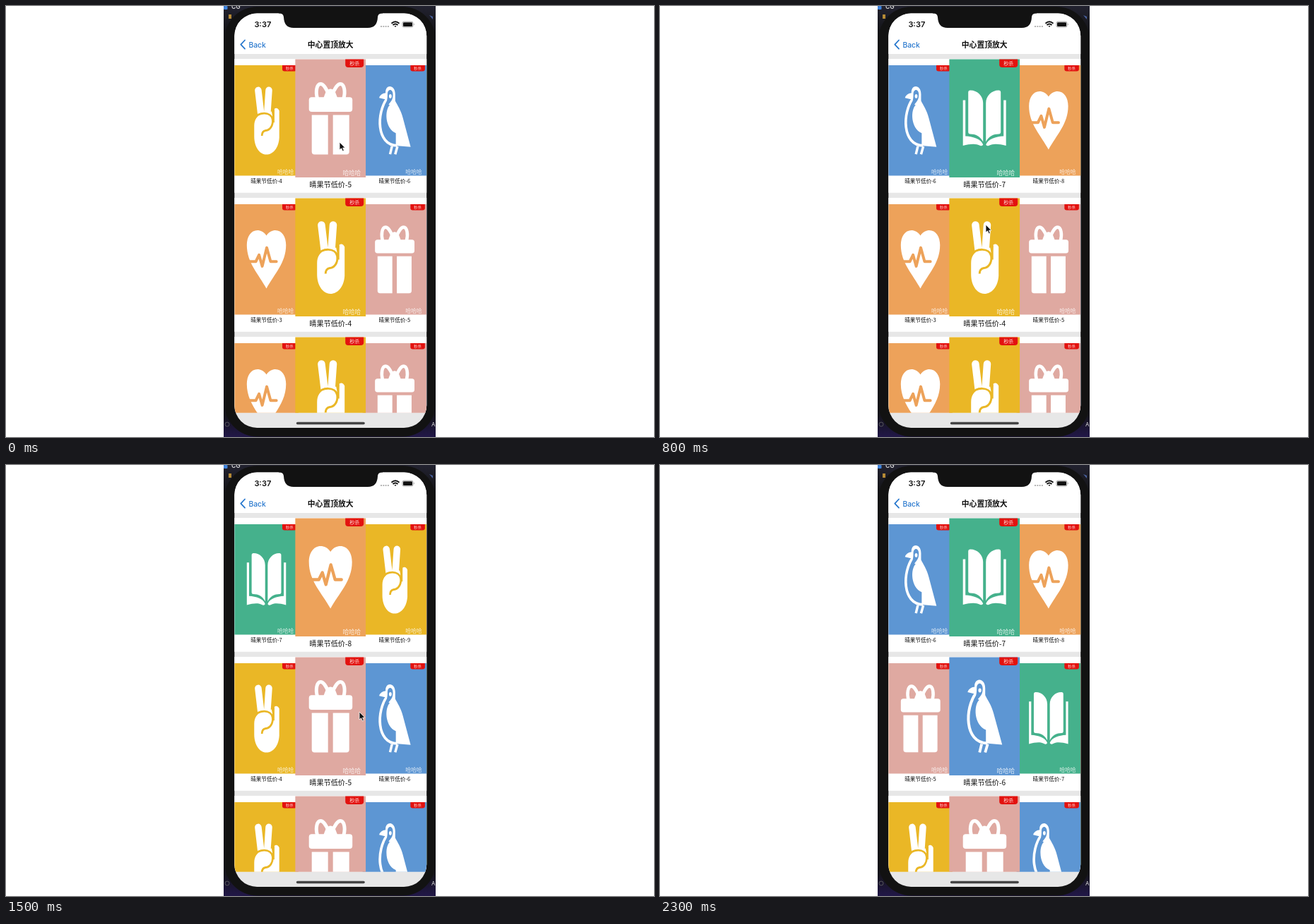
Write an HTML page that moves like this. It is 917 px wide and 611 px high and loops after 2.4 s.

```html
<!DOCTYPE html>
<html lang="zh">
<head>
<meta charset="utf-8">
<title>中心置顶放大</title>
<style>
  html, body { margin: 0; width: 100%; height: 100%; overflow: hidden; background: #fff; }
  svg { display: block; width: 917px; height: 611px; }
  text { font-family: "Noto Sans CJK SC", "Noto Sans CJK", sans-serif; }
  .ui { font-family: Inter, Roboto, sans-serif; }
</style>
</head>
<body>
<svg viewBox="0 0 917 611" xmlns="http://www.w3.org/2000/svg">
  <defs>
    <clipPath id="screen"><rect x="323.3" y="10.5" width="271.9" height="587.5" rx="32"/></clipPath>
    <clipPath id="desk"><rect x="308" width="300" height="611"/></clipPath>
    <linearGradient id="wall" x2="0" y2="1">
      <stop offset="0" stop-color="#222230"/><stop offset=".06" stop-color="#141417"/>
      <stop offset=".95" stop-color="#15141b"/><stop offset="1" stop-color="#211748"/>
    </linearGradient>
  </defs>

  <g clip-path="url(#desk)">
    <rect x="308" width="300" height="611" fill="url(#wall)"/>
    <rect x="308" width="5.5" height="5" rx="1" fill="#3f83dc"/>
    <path d="M315 12h4v6h-4z" fill="#b58a35"/>
    <path d="M599 13l5 2v4z" fill="#4861a0"/>
    <circle cx="313" cy="593" r="3" fill="none" stroke="#55555c"/>
    <text class="ui" x="602" y="596" font-size="8" fill="#ddd">Al</text>
    <rect x="309.5" y="1" width="298" height="609.5" rx="46" fill="#121212"/>
    <text class="ui" x="319" y="4" font-size="8.5" font-weight="600" fill="#ddd">CG</text>
  </g>

  <g clip-path="url(#screen)">
    <rect x="323" y="10" width="273" height="589" fill="#e7e7e7"/>
    <rect x="323" y="10" width="273" height="58" fill="#fff"/>
    <g id="rows"></g>
    <text class="ui" x="363.3" y="30" font-size="11" font-weight="600" text-anchor="middle" fill="#111">3:37</text>
    <path d="M530 29h12" stroke="#b5b5b5" stroke-width="2" stroke-dasharray="2 1.3"/>
    <g fill="none" stroke="#111" stroke-width="1.9">
      <path d="M545.5 24.8Q551 19.8 556.5 24.8M547.5 27Q551 23.9 554.5 27"/>
      <path d="M549.5 28.6L551 30L552.5 28.6Q551 27.3 549.5 28.6Z" fill="#111" stroke="none"/>
    </g>
    <rect x="561" y="22.2" width="15" height="7.8" rx="2.2" fill="#fff" stroke="#888" stroke-width=".8"/>
    <rect x="562" y="23.2" width="13" height="5.8" rx="1.3" fill="#111"/>
    <path d="M577 24.5q1.4 1.5 0 3z" fill="#777"/>
    <path d="M338 48.5L332.3 54.6L338 60.7" fill="none" stroke="#2878ce" stroke-width="1.8" stroke-linecap="round" stroke-linejoin="round"/>
    <text class="ui" x="343.5" y="58.5" font-size="10.3" font-weight="500" fill="#2878ce">Back</text>
    <text x="459.2" y="58.6" font-size="10.8" font-weight="700" text-anchor="middle" fill="#111">中心置顶放大</text>
    <rect x="410.800" y="589.7" width="97" height="3.6" rx="1.8" fill="#444"/>
  </g>
  <path d="M386 9V10.5C391 10.5 392.5 12 393 16C393.5 26 398 31 407 31H512C521 31 525.5 26 526 16C526.5 12 528 10.5 533 10.5V9Z" fill="#121212"/>

  <path id="cursor" d="M0 0V11L2.6 8.8L4.4 12.8L6.3 12L4.6 8.1H7.9Z" fill="#111" stroke="#fff" stroke-width=".8"/>
</svg>

<script>
const STEP = 100, STEPS = 24;
const MID = 459.2, GAP = 90.67, PITCH = 197;
const CARD_W = 99.7, CARD_H = 167.5;

// Icons are drawn from the top centre of an enlarged card.
const page = `<path d="M-23 47Q-23 44-20 44C-10 44-2 52-2 62V117C-6 109-13 106-20 106Q-23 106-23 103Z"/>
  <path d="M-30.5 58H-27V109C-16 109.5-5 113-2 121Q-3 123.5-6 122.5C-13 119-20 120-30.5 122.5Z"/>`;
const loop = `<path d="M-2 50C-6 43-9 35-14 35C-19.5 35-21.5 46-18.500 56" fill="none" stroke="#fff" stroke-width="5"/>`;
const mirror = part => part + `<g transform="scale(-1 1)">${part}</g>`;

const kinds = [
  { color: '#dfa9a1', icon: mirror(loop) + `<path d="M-6.500 46Q0 38 6.500 46L10 55H-10Z"/>
      <rect x="-30.5" y="53.7" width="61.5" height="20.8" rx="4"/>` +
      mirror('<path d="M-3.5 79H-26.5V131Q-26.5 135-22.5 135H-3.5Z"/>') },
  { color: '#5d96d3', icon: `
      <path d="M-14 42C-15 28.5 1 28.5 1 44V57C-2 63-9 62-11 57L-13 52L-16 51.5L-24 49.5Q-22 43-14 42Z"/>
      <path d="M-12 51C-28 72-29 121 4 122" fill="none" stroke="#fff" stroke-width="4"/>
      <path d="M-7 60C-16 68-15 96 2 103V122L25 124L13 80C10 68 4 60 1 54Z"/>
      <path d="M-11 44C-11 35-2.5 35-2.5 45C-2.5 56-10 57-13 66L-15 60C-12 56-11 52-11 44Z" fill="#5d96d3"/>
      <ellipse cx="-6.6" cy="47" rx="2.1" ry="3"/>
      <path d="M-4 123L-7 135M4.5 123L1 135" stroke="#fff" stroke-width="3.8"/>` },
  { color: '#45b18c', icon: mirror(page) },
  { color: '#eda25a', icon: `
      <path d="M0 47.5C-4 41.500-9 39.5-14 39.5C-24 39.5-30.5 49-30.5 62C-30.5 89-12 106 0 128C12 106 30.5 89 30.5 62C30.5 49 24 39.5 14 39.5C9 39.5 4 41.5 0 47.5Z"/>
      <path d="M-29 87H-16.500L-11.5 77L-6.5 94L.5 66L6.5 87H15.5" fill="none" stroke="#eda25a" stroke-width="4.4" stroke-linecap="round" stroke-linejoin="round"/>` },
  { color: '#eab726', icon: `
      <path d="M-12.8 38L-8 78M3.8 38L1 78" stroke="#fff" stroke-width="10.5" stroke-linecap="round"/>
      <path d="M-19 92C-19 82-14 76-8 74L8 70L11 85L12.5 66Q17 63 20 69V110C19 126 10 135.5 0 135.5C-12 135-19 122-19 108Z"/>
      <path d="M-18.5 81C-12 70 7 70 9.5 82C11 92 5 98.5-1 99C-5 99.500-7 103-7 107M11 67V87" fill="none" stroke="#eab726" stroke-width="3"/>` }
];

// Keys are [step, value...]; a step is a tenth of a second.
const scrolls = [
  [[0, 5], [1, 5.2], [2, 5.75], [3, 5.98], [4, 6], [5, 6.3], [6, 6.86], [7, 7],
   [11, 7], [12, 7.25], [13, 7.796], [14, 7.98], [15, 8], [19, 8], [20, 7.6], [21, 7.15], [22, 7.01], [23, 7]],
  [[8, 4], [9, 4.4], [10, 4.875], [11, 5], [15, 5], [16, 5.65], [17, 5.98], [18, 6]],
  [[10, 4], [11, 4.6], [12, 4.96], [13, 5]]
];
const pointer = [[0, 472, 193], [2, 425, 188], [4, 512, 176], [6, 430, 182], [8, 461, 310], [9, 440, 360],
  [10, 534, 502], [11, 450, 510], [12, 520, 190], [13, 490, 162], [15, 500, 350], [16, 430, 345],
  [17, 443, 240], [19, 425, 170], [21, 530, 165]];

const mix = (a, b, p) => a + (b - a) * p;

function sample(keys, step) {
  if (step <= keys[0][0]) return keys[0].slice(1);
  const i = keys.findIndex(k => k[0] >= step);
  if (i < 0) return keys[keys.length - 1].slice(1);
  const a = keys[i - 1], b = keys[i], p = (step - a[0]) / (b[0] - a[0]);
  return a.slice(1).map((v, j) => mix(v, b[j + 1], p));
}

function make(parent, html) {
  const g = document.createElementNS('http://www.w3.org/2000/svg', 'g');
  g.innerHTML = html;
  return parent.appendChild(g);
}

function makeCard(row, n) {
  const { color, icon } = kinds[n % 5];
  const el = make(row, '');
  return {
    n, el,
    face: make(el, `<rect x="${-CARD_W / 2}" width="${CARD_W}" height="${CARD_H}" fill="${color}"/><g fill="#fff">${icon}</g>`),
    tag: make(el, `<path d="M-26 0H0V7.5Q0 11.5-4 11.5H-22Q-26 11.5-26 7.5Z" fill="#e3120f"/>
      <text x="-13" y="8.3" font-size="7" text-anchor="middle" fill="#ffe3df">秒杀</text>`),
    note: make(el, '<text font-size="8.6" text-anchor="end" fill="#fff" fill-opacity=".78">哈哈哈</text>'),
    label: make(el, `<text font-size="10.15" font-weight="500" text-anchor="middle" fill="#111">晴果节低价-${n}</text>`)
  };
}

function makeRow(keys, i) {
  const root = document.getElementById('rows');
  const g = make(root, `<clipPath id="row${i}"><rect x="323" y="74.8" width="273" height="${i < 2 ? 190.2 : 108}"/></clipPath>
    <rect x="323" y="74.8" width="273" height="190" fill="#fff"/>`);
  g.setAttribute('transform', `translate(0 ${i * PITCH})`);
  g.setAttribute('clip-path', `url(#row${i})`);
  const cards = [];
  for (let n = 2; n <= 10; n++) cards.push(makeCard(g, n));
  return { g, keys, cards };
}

function place(el, x, y, sx, sy = sx) {
  el.setAttribute('transform', `translate(${x} ${y}) scale(${sx} ${sy})`);
}

function layout(row, step) {
  const [pos] = sample(row.keys, step);
  const far = c => Math.abs(c.n - pos);
  row.cards.sort((a, b) => far(b) - far(a));
  for (const c of row.cards) {
    const p = Math.max(0, 1 - far(c));
    const top = mix(84, 75.5, p), sx = mix(1 / 1.1, 1, p);
    place(c.el, MID + (c.n - pos) * GAP, 0, 1);
    place(c.face, 0, top, sx, mix(156.5 / CARD_H, 1, p));
    place(c.tag, mix(43, 47, p), top, mix(.79, 1, p), mix(.73, 1, p));
    place(c.note, mix(38.8, 43, p), mix(238.3, 239.5, p), sx);
    place(c.label, 0, mix(250.9, 257.4, p), mix(.745, 1, p));
    row.g.appendChild(c.el);
  }
}

const rows = scrolls.map(makeRow);
const cursor = document.getElementById('cursor');
const start = performance.now();
let shown = -1;

function draw(now) {
  const step = Math.floor(Math.max(0, now - start) / STEP) % STEPS;
  if (step !== shown) {
    shown = step;
    rows.forEach(r => layout(r, step));
    const [x, y] = sample(pointer, step);
    place(cursor, x, y, 1);
    cursor.style.display = step < 22 ? '' : 'none';
  }
  requestAnimationFrame(draw);
}
draw(start);
</script>
</body>
</html>
```
